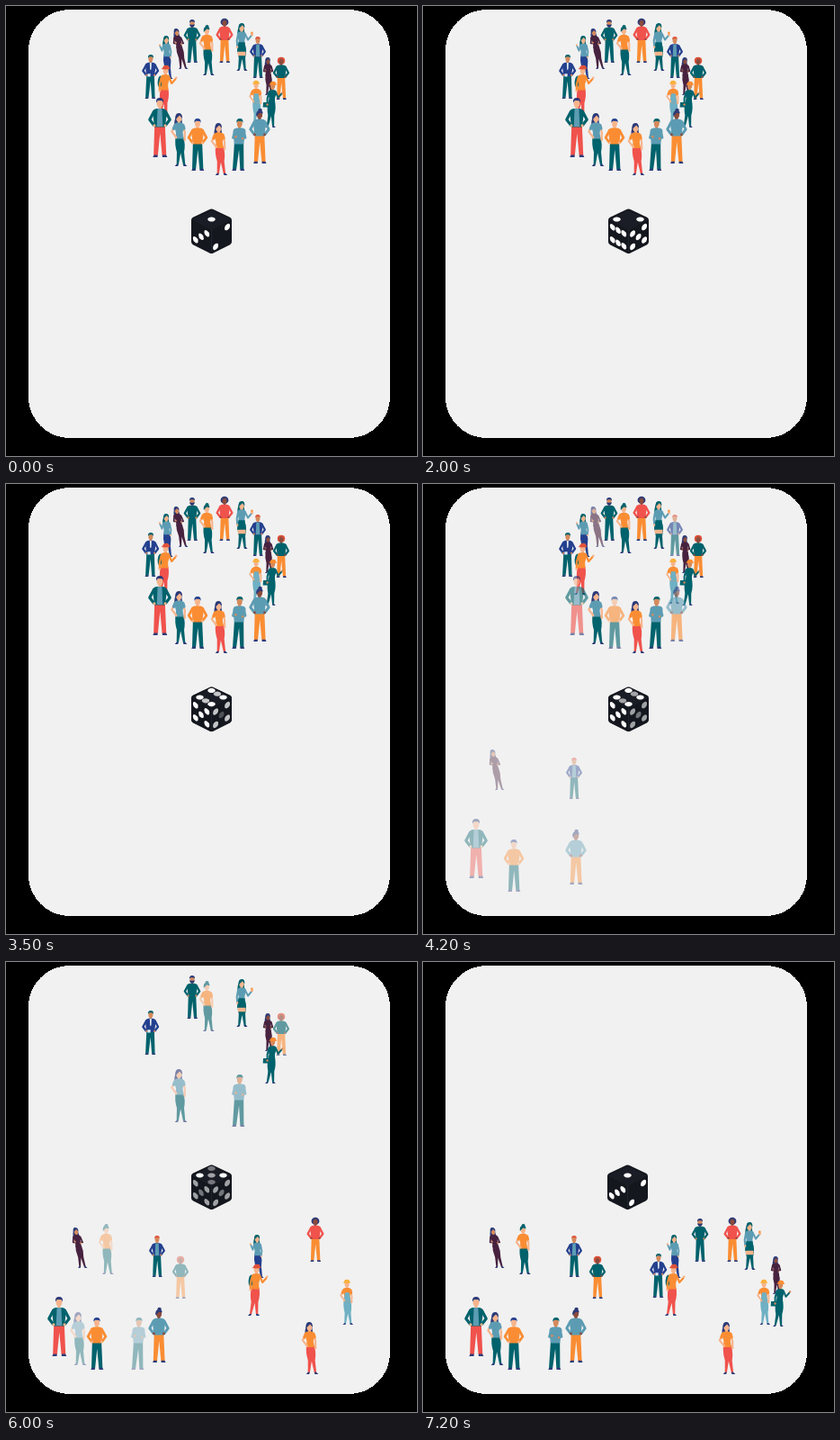
These frames come from a looping animation (457x500 px, 9.2 s). An HTML page:

```html
<!DOCTYPE html>
<html lang="en">
<head>
<meta charset="utf-8">
<title>Random groups</title>
<style>
  html, body { margin: 0; width: 100%; height: 100%; overflow: hidden; background: #000; }
  svg { display: block; width: 457px; height: 500px; }
</style>
</head>
<body>
<svg viewBox="0 0 457 500">
  <rect x="25" y="4" width="402" height="476" rx="46" fill="#f1f1f1" shape-rendering="crispEdges"/>
  <g id="people"></g>
  <g id="dice"></g>
</svg>
<script>
const LOOP = 9200, STEP = 100;
// Each dissolve: start time and number of steps.
const fades = [[100, 4], [900, 4], [1700, 4], [2500, 4], [3300, 4],
               [4100, 5], [5000, 5], [5900, 5], [6800, 5]];

const teal = '#00626c', navy = '#24408e', ink = '#2b3a78', blue = '#5c9cb3', orange = '#fa8d33',
      red = '#f0524c', plum = '#47223f', rust = '#e0523a', gold = '#f8b13c', sky = '#6fb0c4',
      light = '#f7b48c', tan = '#d58a5c', brown = '#8a4b3c';

const shape = (d, fill) => `<path d="${d}" fill="${fill}"/>`;
const line = (d, color, width) => `<path d="${d}" fill="none" stroke="${color}" stroke-width="${width}"/>`;
const oval = (x, y, rx, ry, fill) => `<ellipse cx="${x}" cy="${y}" rx="${rx}" ry="${ry}" fill="${fill}"/>`;

// All figures are 60 units tall with the head at x = 0.
// Each pose: left arm, right arm, left hand, right hand.
const poses = {
  hips: ['M-6 14L-10.2 22L-6 27.5', 'M6 14L10.2 22L6 27.5', [-5.5, 28], [5.5, 28]],
  fold: ['M-5 14L-7 22L3 23', 'M5 14L7 22L-3 21', [4, 23], [-4, 21]],
  left: ['M-4.5 14L-6.5 21L-9 14', 'M4.5 14L6 22L5 29', [-9.3, 13], [5, 30]],
  right: ['M-4.5 14L-6 22L-5.5 29', 'M4.5 14L8 21L12 16', [-5.5, 30], [12.8, 14.5]],
  hip: ['M-4.5 14L-8.5 21L-4 27', 'M4.5 14L6.2 22L5.8 29', [-4, 27.5], [5.8, 30]]
};
const bodies = {
  man: {
    torso: 'M-3 10.8H3Q7.4 11.5 7.2 15L5.4 29.5H-5.4L-7.2 15Q-7.4 11.5-3 10.8Z',
    legs: 'M-5.3 28H5.3L6.6 58.5H2.4L.3 36L-2 58.5H-6.2Z',
    shoes: 'M-7 60L-5.8 57.8H-2.2V60ZM7.6 60L6.4 57.8H2.6V60Z', arm: 2.9
  },
  woman: {
    torso: 'M-2.4 10.8H2.4Q5.8 11.5 5.4 15L3.8 22L4.6 29H-4.6L-3.8 22L-5.4 15Q-5.8 11.5-2.4 10.8Z',
    legs: 'M-4.4 27H4.4Q6.6 35 4.6 44L5.4 58.5H3L.6 45L-2.2 58.5H-4.4L-3.6 44Q-6 35-4.4 27Z',
    shoes: 'M-6.5 60L-4.4 57.8H-2.2L-3 60ZM3 57.8H5.4L7.5 60H3.4Z', arm: 2.3
  }
};
const backHair = {
  long: c => shape('M-3 2Q-5.6 9-5.6 16Q-1 19 4 15Q3 8 3 2Z', c),
  afro: c => oval(0, 4.8, 5.4, 5, c)
};
const frontHair = {
  short: c => shape('M-3.6 5Q-4.4 0 0 0Q4.4 0 3.6 5L2.5 3L-2 2.8Z', c),
  long: c => shape('M-3.7 7Q-4.4 0 0 0Q4.4 0 3.7 6L1 2.6Z', c),
  afro: c => shape('M-4 4Q0-1 4 4L0 2.6Z', c),
  bun: c => oval(.6, .8, 2.2, 2, c) + shape('M-3.7 7.5Q-4.4 1 0 1Q4 1 3.5 4.5L0 3.8Z', c),
  hat: c => shape('M-5.6 4.2Q-4 3.6-3.7 2Q-3-.4 0-.3Q3.4-.4 3.8 2Q4.2 3.5 5.6 4Q0 5.2-5.6 4.2Z', c)
};
const extras = {
  shirt: shape('M-2.2 11H2.2L3 29H-3Z', blue),
  white: shape('M-1.2 11H1.2L1 20L-.6 21Z', '#e4eef2') + shape('M-4 26H0V30H-4Z', '#e4eef2'),
  beard: shape('M-3.2 6.5Q0 8 3.2 6.5Q3 10.6 0 10.6Q-3 10.6-3.2 6.5Z', ink),
  bag: shape('M-11 27H-3V33.5H-11Z', teal),
  dress: shape('M-3.9 24H3.9L5.8 36H-5.8Z', teal) + shape('M-5 36H5V41H-4.6Z', light) +
         shape('M11.6 11H14.2V16H11.6Z', orange),
  bib: shape('M-2.8 17H2.8L4.6 29H-4.6Z', sky)
};

function figure(sex, hair, hairColor, skin, top, pants, pose, sleeve, extra) {
  const { torso, legs, shoes, arm } = bodies[sex], [armL, armR, handL, handR] = poses[pose];
  const cuffs = sleeve == skin ? line('M-4.6 14L-6.2 17.5M4.6 14L5.4 17.5', top, 3.4) : '';
  return (backHair[hair]?.(hairColor) ?? '') +
    (extra == 'pack' ? oval(-5.5, 19, 3, 7, teal) : '') +
    shape(legs, pants) + shape(shoes, ink) +
    shape('M-1.5 8H1.5V12.5H-1.5Z', skin) + shape(torso, top) + (extras[extra] ?? '') +
    line(armL, sleeve, arm) + line(armR, sleeve, arm) + cuffs +
    oval(...handL, 1.4, 1.4, skin) + oval(...handR, 1.4, 1.4, skin) +
    oval(0, 5.6, 3.1, 4.4, skin) + frontHair[hair](hairColor) +
    (extra == 'beard' ? extras.beard : '');
}

// x, top, height, dissolve, lean in degrees, then the look; back to front.
const people = [
  [207, 15, 48, 8, 0, 'man', 'short', ink, tan, teal, teal, 'hips', teal, 'beard'],
  [243, 14, 49, 6, 0, 'man', 'afro', ink, brown, red, orange, 'hips', red],
  [223, 22, 55, 7, 2, 'woman', 'bun', teal, light, orange, teal, 'hip', light],
  [262, 19, 53, 8, 0, 'woman', 'long', teal, light, blue, teal, 'right', blue, 'dress'],
  [280, 34, 46, 5, 0, 'man', 'short', rust, tan, navy, teal, 'hips', navy, 'shirt'],
  [189, 25, 45, 5, 10, 'woman', 'long', ink, tan, plum, plum, 'fold', plum],
  [178, 33, 48, 6, 2, 'woman', 'long', teal, light, blue, navy, 'left', blue],
  [161, 54, 49, 8, -1, 'man', 'short', teal, tan, navy, teal, 'hips', navy, 'white'],
  [291, 57, 42, 8, 2, 'woman', 'long', ink, brown, plum, plum, 'fold', plum],
  [306, 57, 47, 7, 0, 'man', 'afro', rust, brown, teal, orange, 'hips', teal],
  [178, 66, 57, 6, -4, 'woman', 'hat', rust, light, orange, red, 'right', orange, 'pack'],
  [278, 83, 50, 6, 1, 'woman', 'hat', gold, light, orange, sky, 'hip', light, 'bib'],
  [297, 84, 51, 8, -4, 'woman', 'hat', orange, tan, teal, teal, 'right', teal, 'bag'],
  [171, 102, 66, 5, 0, 'man', 'short', ink, light, teal, red, 'hips', teal, 'shirt'],
  [282, 115, 60, 5, 0, 'man', 'bun', ink, brown, blue, orange, 'hips', blue],
  [192, 119, 59, 7, 2, 'woman', 'long', ink, light, blue, teal, 'hip', light],
  [260, 125, 58, 7, -2, 'man', 'short', teal, tan, blue, teal, 'fold', blue],
  [213, 125, 58, 5, 0, 'man', 'short', navy, light, orange, teal, 'hips', orange],
  [236, 130, 58, 6, 3, 'woman', 'long', ink, light, orange, red, 'hip', light]
];

const svgGroup = (inner, parent) => {
  const g = document.createElementNS('http://www.w3.org/2000/svg', 'g');
  g.innerHTML = inner;
  return document.getElementById(parent).appendChild(g);
};

const crowd = people.map(([x, y, h, fade, lean, ...look]) => {
  const art = figure(...look);
  const place = (dx, dy) => svgGroup(
    `<g transform="translate(${x + dx} ${y + dy}) scale(${h / 60}) skewX(${lean})" ` +
    `stroke-linejoin="round" stroke-linecap="round">${art}</g>`, 'people');
  return { fade, ring: place(0, 0), team: place(fade % 2 ? -112 : 101, 270) };
});

// Pips are cells 0-8 of a 3 x 3 grid on the top, left and right face.
const planes = ['6.5 3.8 -6.5 3.8 228.5 237', '6.3 3.5 0 7 217 256.3', '6.5 -3.7 0 7.2 239.6 256.5'];
const rolls = ['4 246 26', '012678 02468 0268', '02468 48 4', '26 012678 02468', '0268 02468 4',
               '012678 02468 0268', '0268 02468 4', '246 0268 0268', '0268 4 4', '4 246 26'];

const dice = rolls.map((roll, i) => {
  const faces = roll.split(' ').map((pips, f) => `<g transform="matrix(${planes[f]})">` +
    [...pips].map(p => oval(p % 3 - 1, Math.floor(p / 3) - 1, .46, .46, '#fff')).join('') + '</g>');
  const g = svgGroup(
    '<path d="M228.5 229L247.5 238V262L228.5 271.5L209.5 262V238Z" fill="#14171e" ' +
    'stroke="#14171e" stroke-width="7" stroke-linejoin="round"/>' +
    shape('M228.5 227L248 236.5L228.5 247L209 236.5Z', '#1a1d25') +
    line('M208 237L228.5 248L249 237M228.5 248V273', '#252932', .7) + faces.join(''), 'dice');
  if (i == 2 || i == 9) g.setAttribute('transform', 'translate(-1 0)');
  return g;
});

function level(i, t) {
  if (i < 0) return 1;
  if (i >= fades.length || t < fades[i][0]) return 0;
  const [start, steps] = fades[i];
  return Math.min(1, (Math.floor((t - start) / STEP) + 1) / steps);
}

function draw(t) {
  for (const { fade, ring, team } of crowd) {
    const k = level(fade, t);
    ring.setAttribute('opacity', 1 - k);
    team.setAttribute('opacity', k);
  }
  dice.forEach((die, i) => die.setAttribute('opacity', level(i, t) == 1 ? 0 : level(i - 1, t)));
}

const begin = performance.now();
function tick() {
  draw((performance.now() - begin) % LOOP);
  requestAnimationFrame(tick);
}
tick();
</script>
</body>
</html>
```
